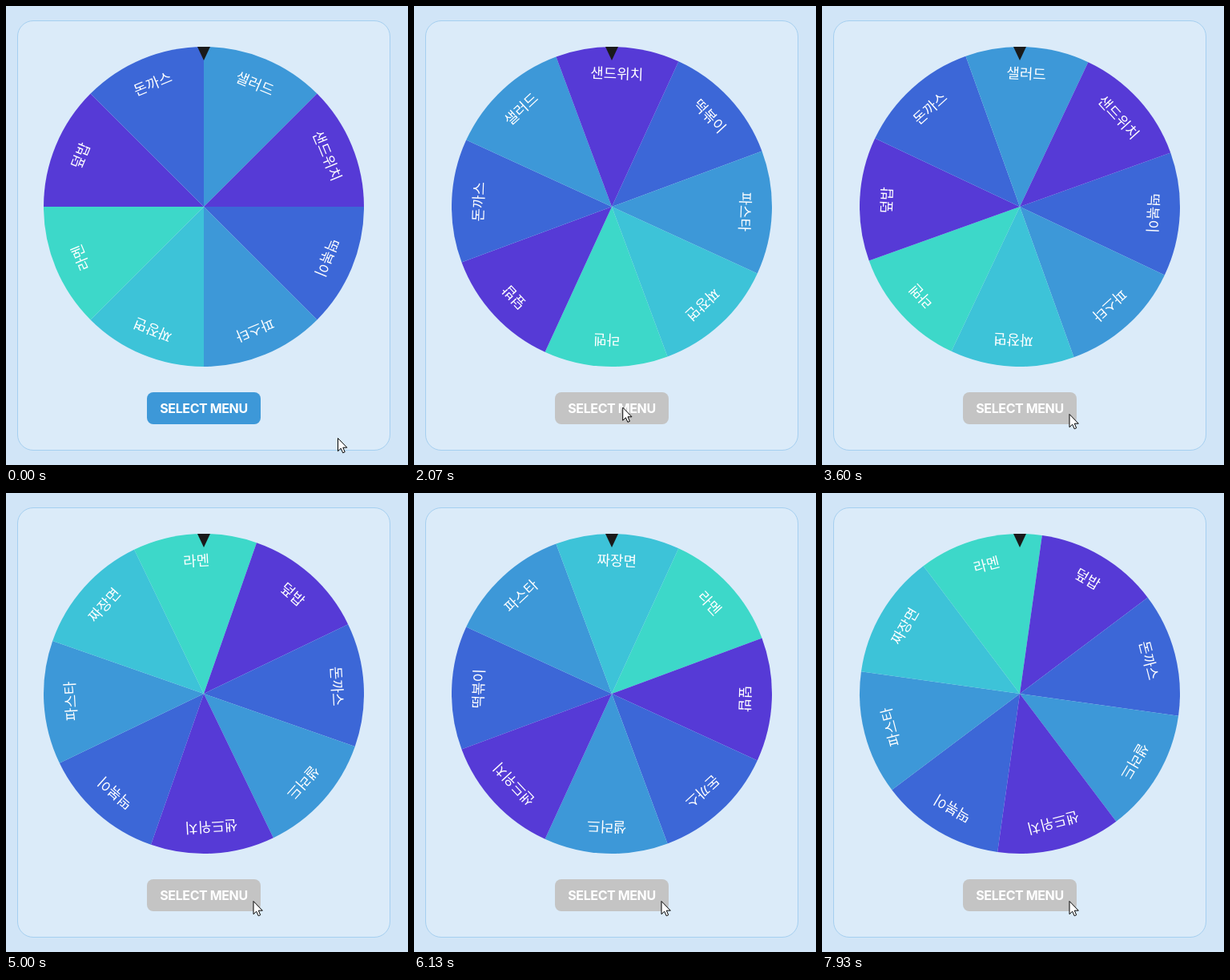
An HTML page for the animation above (8 s loop, 502 by 574 pixels).

```html
<!DOCTYPE html>
<html lang="ko">
<head>
<meta charset="utf-8">
<style>
  html, body { margin: 0; width: 100%; height: 100%; overflow: hidden; background: #d1e5f7; }
  svg { display: block; width: 502px; height: 574px; }
  text { fill: #fff; text-anchor: middle; }
  #wheel text { font: 18px "Noto Sans CJK KR", "Noto Sans CJK", sans-serif; }
  #label { font: 700 16px Inter, sans-serif; letter-spacing: -.4px; }
</style>
</head>
<body>
<svg viewBox="0 0 502 574">
  <rect x="14.5" y="18.5" width="465" height="537" rx="19.5" fill="#dbebf9" stroke="#a5cff0"/>
  <g id="wheel"></g>
  <path d="M239 51h16l-8 17z" fill="#1a1a1a"/>
  <rect id="button" x="176" y="483" width="142" height="40" rx="8"/>
  <text id="label" x="247" y="508.5">SELECT MENU</text>
  <g id="cursor" fill="#fff" stroke="#000" stroke-linejoin="round">
    <path id="arrow" d="M.5 .5V16.7L4.2 13.2 6.7 18.8 9.2 17.7 6.8 12.2H11.8Z"/>
    <path id="hand" d="M-1.5 14V2a1.5 1.5 0 0 1 3 0V8.5a1.6 1.6 0 0 1 3.2 .5a1.6 1.6 0 0 1 3.2 .6a1.5 1.5 0 0 1 3 .8V16l-2 4v3H.2v-2.5L-5.6 13.5a1.6 1.6 0 0 1 2.4-2z"/>
  </g>
</svg>
<script>
const LOOP = 8000;
const menu = ['떡볶이', '파스타', '짜장면', '라멘', '덮밥', '돈까스', '샐러드', '샌드위치'];
const colors = ['#3c67d7', '#3d98d8', '#3dc3d8', '#3dd8c9', '#563ad6', '#3c67d7', '#3d98d8', '#563ad6'];

// Each key: time, angle, speed in degrees per ms
const spins = [
  [[880, 0, .3], [1530, 1265, 2.4], [2600, 3260, 1.05], [3600, 3940, .27], [4200, 4027.5, 0]],
  [[4820, 0, .3], [5600, 1132.5, 2.4], [6730, 3231.1, .95], [7930, 3697.9, .1], [8130, 3712.5, 0]]
];
// Each key: time, x, y
const path = [[50, 414, 540], [330, 255, 501], [1950, 255, 501], [2600, 283, 504], [3050, 308.5, 510]];

const el = id => document.getElementById(id);
const wheel = el('wheel'), button = el('button'), cursor = el('cursor');
const edge = 200 * Math.SQRT1_2;

wheel.innerHTML = menu.map((name, i) => `
  <g transform="rotate(${i * 45 + 90})">
    <path d="M0 0V-200A200 200 0 0 1 ${edge} ${-edge}Z" fill="${colors[i]}"/>
    <text transform="rotate(22.5)" y="-160">${name}</text>
  </g>`).join('');

// The pair of keys around t, or the last key alone
function around(keys, t) {
  const i = keys.findIndex(k => k[0] > t);
  return i < 0 ? [keys.at(-1), keys.at(-1), 0]
    : i === 0 ? [keys[0], keys[0], 0]
    : [keys[i - 1], keys[i], (t - keys[i - 1][0]) / (keys[i][0] - keys[i - 1][0])];
}

function angleAt(t) {
  const [a, b, u] = around(spins[t < spins[1][0][0] ? 0 : 1], t);
  const d = b[0] - a[0], v = 1 - u;
  return a[1] * v * v * (1 + 2 * u) + b[1] * u * u * (3 - 2 * u) + d * u * v * (a[2] * v - b[2] * u);
}

function draw(now) {
  const t = now % LOOP;
  const [a, b, u] = around(path, t);
  const x = a[1] + (b[1] - a[1]) * u, y = a[2] + (b[2] - a[2]) * u;
  const spinning = spins.some(s => t >= s[0][0] && t < s.at(-1)[0]);
  const hover = !spinning && x < 318 && y < 523;

  wheel.setAttribute('transform', `translate(247 251) rotate(${angleAt(t)})`);
  button.setAttribute('fill', spinning ? '#c4c4c4' : hover ? '#328bca' : '#3d98d8');
  cursor.setAttribute('transform', `translate(${x} ${y})`);
  el('hand').style.display = hover ? '' : 'none';
  el('arrow').style.display = hover ? 'none' : '';
}

const start = performance.now();
(function tick() {
  draw(performance.now() - start);
  requestAnimationFrame(tick);
})();
</script>
</body>
</html>
```
